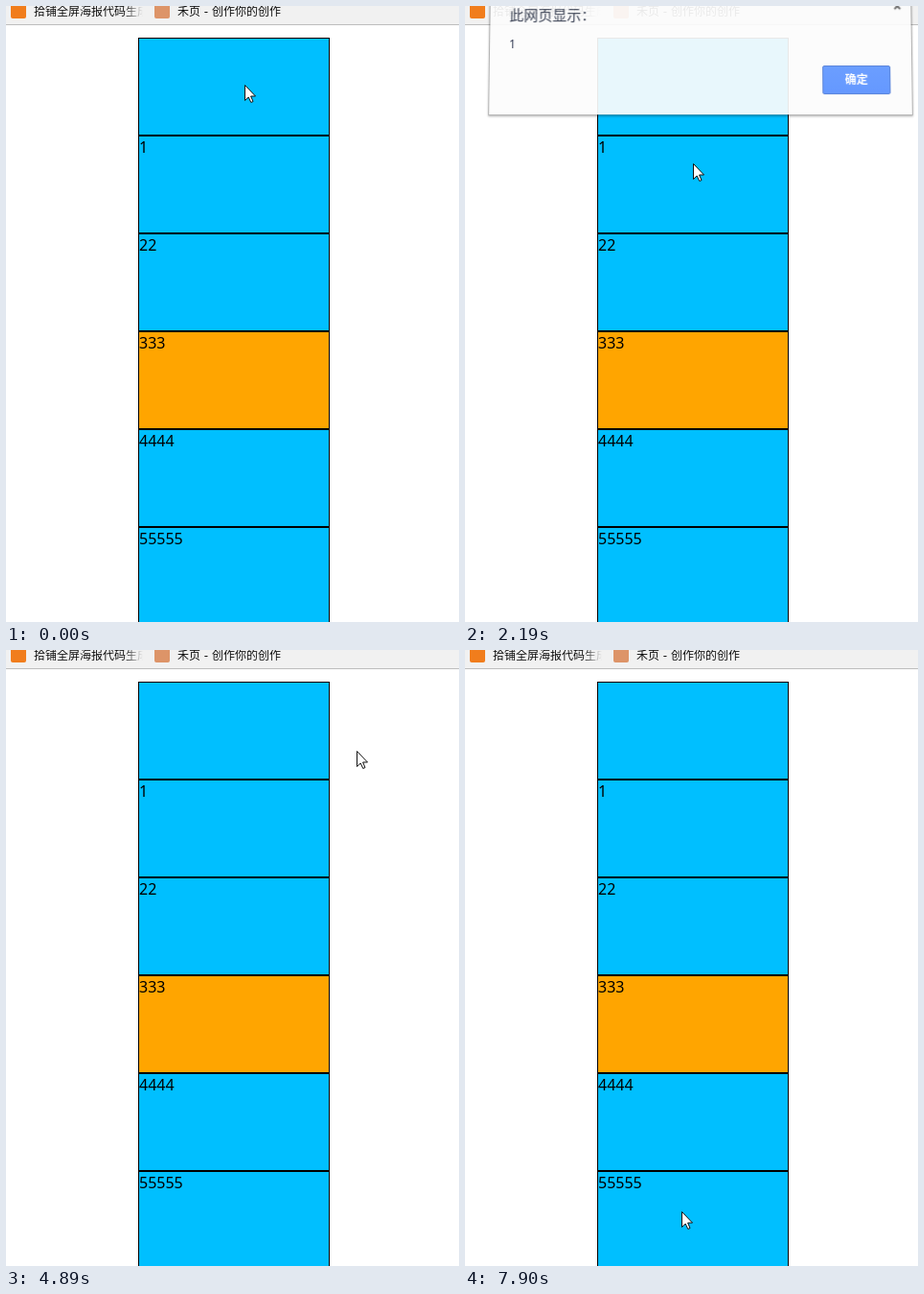
Write an HTML page that moves like this. It is 473 px wide and 642 px high and loops after 8 s.

```html
<!DOCTYPE html>
<html lang="zh">
<head>
<meta charset="utf-8">
<title>Click index demo</title>
<style>
  html, body { margin: 0; width: 100%; height: 100%; overflow: hidden; background: #fff; }
  body { position: relative; }
  body * { position: absolute; box-sizing: border-box; white-space: nowrap; }
  .bar {
    left: 0; top: 0; width: 100%; height: 20px; overflow: hidden;
    background: #f1f1f1; border-bottom: 1px solid #bdbdbd;
    font: 12px/16px "DejaVu Sans", "Noto Sans CJK SC", "Noto Sans CJK", sans-serif; color: #111;
  }
  .icon { top: -3px; width: 16px; height: 16px; border-radius: 2px; }
  .mark { top: -2px; }
  .fade { left: 29px; width: 114px; overflow: hidden; }
  .fade::after {
    content: ""; position: absolute; right: 0; top: 0; width: 20px; height: 16px;
    background: linear-gradient(90deg, rgba(241,241,241,0), #f1f1f1);
  }
  .cell {
    left: 138px; width: 200px; height: 102px; border: 1px solid #000; background: #00bfff;
    font: 16px/22px "Noto Sans", sans-serif; color: #000;
  }
  .cell.odd { background: #ffa500; }
  #dialog {
    left: 26px; top: -7px; width: 440px; height: 127px; background: #fcfcfc; color: #2c3448;
    box-shadow: 0 0 0 1px rgba(0,0,0,.16), 0 1px 2px 1px rgba(0,0,0,.28);
    font-family: "Noto Sans", "Noto Sans CJK SC", "Noto Sans CJK", sans-serif;
  }
  #title {
    left: 20px; top: 13px; font-size: 15px; line-height: 20px;
    font-family: "Noto Sans CJK TC", "Noto Sans CJK", sans-serif;
  }
  #label { left: 20px; top: 46px; font-size: 12px; line-height: 16px; color: #1c2540; }
  #close { left: 422px; top: 10px; }
  #ok {
    left: 347px; top: 76px; width: 71px; height: 30px; border: 1px solid #4c7ad6; border-radius: 2px;
    background: linear-gradient(#5e96ff, #588fff); color: #fff;
    font-weight: bold; font-size: 12px; line-height: 28px; text-align: center;
  }
  #ok.down { background: #447bdc; border-color: #2f5cb4; box-shadow: inset 0 0 0 1px #6b97e6; }
  #cursor { left: 0; top: 0; }
</style>
</head>
<body>
<div class="bar">
  <div class="icon" style="left:5px;background:#f17d1c"></div>
  <div class="mark fade">拾铺全屏海报代码生成</div>
  <div class="icon" style="left:155px;background:#dd9468"></div>
  <div class="mark" style="left:179px">禾页 - 创作你的创作</div>
</div>
<div id="cells"></div>
<div id="dialog">
  <div id="title">此网页显示：</div>
  <div id="label"></div>
  <svg id="close" width="8" height="8"><path d="M1 1L7 7M7 1L1 7" stroke="#666" stroke-width="2"/></svg>
  <div id="ok">确定</div>
</div>
<svg id="cursor" width="14" height="21">
  <path d="M.5 .5V16.5L4.2 13L6.8 18.5L9 17.5L6.6 12H11.5Z" fill="#fff" stroke="#111" stroke-linejoin="round"/>
</svg>
<script>
const LOOP = 8000, STEP = 80, PHASE = 20;
const SLIDE = 200, RISE = 13.3;
const TOP = 33, SIZE = 102;
const el = id => document.getElementById(id);
const ease = p => p < .5 ? 4 * p ** 3 : 1 - 4 * (1 - p) ** 3;

// Each round: click point, alert opens, pointer reaches the button, alert closes
const rounds = [
  { x: 249, y: 80, open: 540, reach: 1390, shut: 1465 },
  { x: 238, y: 164, open: 2085, reach: 2640, shut: 2970 },
  { x: 224, y: 272, open: 3870, reach: 4560, shut: 4610 },
  { x: 227, y: 452, open: 5967, reach: 6660, shut: 7060 }
];
const button = { x: 371, y: 94 }, end = { x: 226, y: 585 };

// Pointer stops: a short drift, then box -> button -> next box
const stops = [{ t: 0, x: 249, y: 82 }, { t: 300, x: 249, y: 80 }];
rounds.forEach((r, i) => stops.push(
  { ...r, t: r.reach - 400 },
  { ...button, t: r.reach },
  { ...button, t: r.shut + 80 },
  { ...(rounds[i + 1] || end), t: r.shut + 730 }
));

for (let i = 0; i < 6; i++) {
  const cell = document.createElement("div");
  cell.className = i === 3 ? "cell odd" : "cell";
  cell.style.top = TOP + SIZE * i + "px";
  cell.textContent = String(i).repeat(i);
  el("cells").append(cell);
}

function drawPointer(t) {
  const i = stops.findIndex(s => s.t > t);
  const b = stops[i < 0 ? stops.length - 1 : i];
  const a = i < 0 ? b : stops[i - 1];
  const p = a === b ? 1 : ease((t - a.t) / (b.t - a.t));
  const at = k => Math.round(a[k] + (b[k] - a[k]) * p);
  el("cursor").style.transform = `translate(${at("x")}px, ${at("y")}px)`;
}

function drawAlert(t) {
  const box = el("dialog");
  const r = rounds.find(r => t >= r.open && t < r.shut + SLIDE);
  box.style.visibility = r ? "visible" : "hidden";
  if (!r) return;
  const hidden = t < r.shut ? Math.max(0, 1 - (t - r.open) / SLIDE) : (t - r.shut) / SLIDE;
  const lift = RISE * hidden;
  box.style.opacity = 1 - hidden ** 4;
  box.style.transform = hidden
    ? `perspective(500px) translateY(${-lift}px) rotateX(${lift / 4}deg)` : "none";
  el("label").textContent = Math.floor((r.y - TOP) / SIZE);
  el("ok").className = t >= r.shut - 100 ? "down" : "";
}

function frame(now) {
  // The screen refreshes in fixed steps
  const t = Math.max(0, Math.floor((now % LOOP - PHASE) / STEP) * STEP + PHASE);
  drawPointer(t);
  drawAlert(t);
  requestAnimationFrame(frame);
}
frame(0);
</script>
</body>
</html>
```
